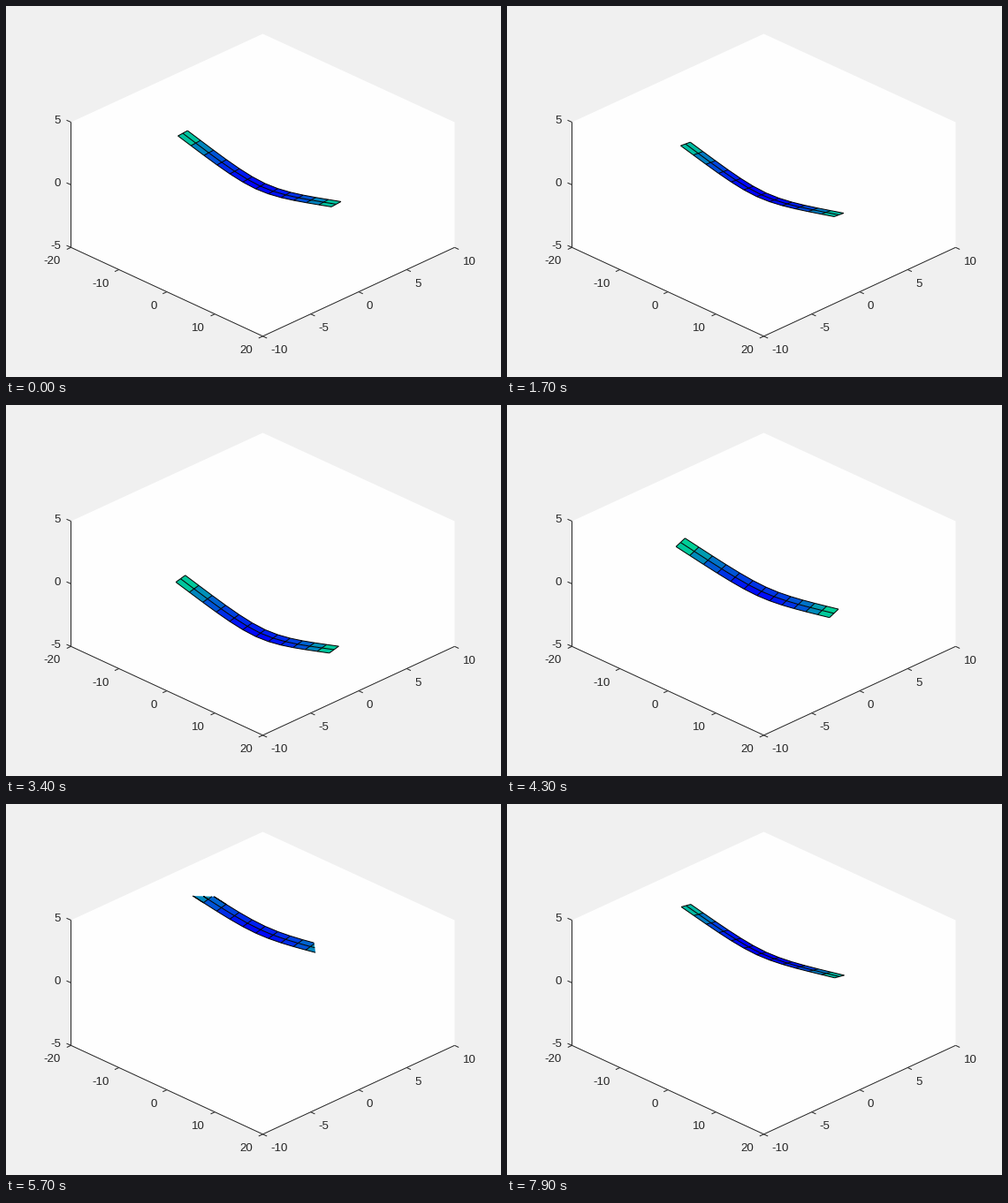
A matplotlib script for the animation above (8000 ms loop, 560 by 420 pixels).

```python
import numpy as np
import matplotlib.pyplot as plt
from matplotlib.animation import FuncAnimation
from matplotlib.collections import LineCollection, PolyCollection

W, H, DPI = 560, 420, 100
FRAMES, STEP = 80, 100            # count, ms
START = 0.4                       # the wing rests until this time, in s
PX = 72 / DPI                     # one pixel in points
INK = "#262626"
HALF_SPAN, CELLS, TOP = 16, 6, 5  # cells per half wing, upper axis limit
CHORD = np.array([-0.75, -0.25, 0.25])

# key times in s and values: sink and climb, nose angle in degrees, tip deflection
HEIGHT = (START, 1.2, 1.7, 3.05, 4.3, 5, 6.45, 7.9, 8.6), (0, -.05, -.72, -4.35, -.43, 2.38, 5.28, 2.4, -.2)
PITCH = (START, 1.9, 4.4, 8), (3.8, -4.5, 20, -8.5)
BEND = (START, 1.7, 3, 5.2, 8), (1.43, 1.2, 1.72, 1.08, 0.95)


def curve(keys, t, glide=0):
    """Cubic through the keys; it eases to rest at each key unless glide is 1."""
    ts, vs = keys
    slope = np.gradient(vs, ts) * glide
    i = int(np.clip(np.searchsorted(ts, t) - 1, 0, len(ts) - 2))
    h = ts[i + 1] - ts[i]
    u = (t - ts[i]) / h
    return ((1 + 2 * u) * (1 - u) ** 2 * vs[i] + u * (1 - u) ** 2 * h * slope[i]
            + u * u * (3 - 2 * u) * vs[i + 1] + u * u * (u - 1) * h * slope[i + 1])


def project(p):
    x, y, z = p
    return 290 + 5.425 * x + 10.85 * y, 202 + 2.51 * x - 5.02 * y - 14.17 * z


def clip_top(points):
    """Cut a polygon or a segment at the upper axis limit, then project it."""
    out = []
    for a, b in zip(points, points[1:] + points[:1]):
        if a[2] <= TOP:
            out.append(a)
        if (a[2] <= TOP) != (b[2] <= TOP):
            out.append(a + (b - a) * (TOP - a[2]) / (b[2] - a[2]))
    return [project(p) for p in out]


def wing(z0, bend, pitch):
    """Mesh of 3D points: a beam bent up at both tips, turned about its quarter chord."""
    sin, cos = np.sin(np.radians(pitch)), np.cos(np.radians(pitch))
    rows = []
    for x in np.linspace(-HALF_SPAN, HALF_SPAN, 2 * CELLS + 1):
        s = abs(x) / HALF_SPAN
        b = bend * (6 * s**2 - 4 * s**3 + s**4) / 3
        rows.append([np.array([x, c * cos - b * sin, z0 + c * sin + b * cos])
                     for c in CHORD])
    return rows


def tint(i, j, pitch):
    """Blue at the root, green at the tips; the rear row follows the pitch."""
    s = (abs(i + 0.5 - CELLS) / CELLS) ** 2
    v = np.clip(0.89 * s + pitch * (0.002 + 0.008 * j * (1 - s)), 0, 1)
    return 0, v, 1 - v / 2


fig = plt.figure(figsize=(W / DPI, H / DPI), dpi=DPI, facecolor="#f0f0f0")
ax = fig.add_axes([0, 0, 1, 1])
ax.set_xlim(-0.5, W - 0.5)
ax.set_ylim(H - 0.5, -0.5)
ax.axis("off")


def line(*pts):
    ax.plot(*zip(*pts), color=INK, lw=PX, solid_capstyle="butt")


def label(x, y, value, ha):
    ax.text(x, y + 4, str(value), ha=ha, va="baseline", color=INK,
            family="Liberation Sans", fontsize=13.33 * PX)


LEFT, MID, RIGHT = 73, 290, 507
SIDE, BOTTOM = 272.8, 373.3
ax.fill([LEFT, MID, RIGHT, RIGHT, MID, LEFT],
        [131, 31, 131, SIDE, BOTTOM, SIDE], color="#fefefe", lw=0)
line((LEFT, 131), (LEFT, SIDE), (MID, BOTTOM), (RIGHT, SIDE))
for k in range(3):
    y = SIDE - 70.9 * k
    line((LEFT, y), (LEFT - 5, y - 2.2))
    label(61.5, y - 2, 5 * k - 5, "right")
for k in range(5):
    dx, dy = (MID - LEFT) / 4 * k, (BOTTOM - SIDE) / 4 * k
    line((LEFT + dx, SIDE + dy), (LEFT - 4.7 + dx, SIDE + 2.2 + dy))
    label(61.5 + dx, 288 + dy, 10 * k - 20, "right")
    line((MID + dx, BOTTOM - dy), (MID + 4.7 + dx, BOTTOM + 2.2 - dy))
    label(299 + dx, 389 - dy, 5 * k - 10, "left")

faces = PolyCollection([], linewidths=0, zorder=3)
edges = LineCollection([], colors="black", linewidths=PX, zorder=4)
ax.add_collection(faces, autolim=False)
ax.add_collection(edges, autolim=False)


def draw(n):
    t = max(n * STEP / 1000, START)
    pitch = curve(PITCH, t)
    mesh = wing(curve(HEIGHT, t, glide=1), curve(BEND, t), pitch)
    polys, tints, segs = [], [], []
    for row in mesh:
        segs += [clip_top(list(p)) for p in zip(row, row[1:])]
    for i, (row, nxt) in enumerate(zip(mesh, mesh[1:])):
        segs += [clip_top(list(p)) for p in zip(row, nxt)]
        for j in range(len(CHORD) - 1):
            poly = clip_top([row[j], row[j + 1], nxt[j + 1], nxt[j]])
            if poly:
                polys.append(poly)
                tints.append(tint(i, j, pitch))
    faces.set_verts(polys)
    faces.set_facecolor(tints or "none")
    edges.set_segments([s for s in segs if s])
    return faces, edges


anim = FuncAnimation(fig, draw, frames=FRAMES, interval=STEP, repeat=True,
                     repeat_delay=0, init_func=lambda: draw(0), blit=False)
plt.show()
```
